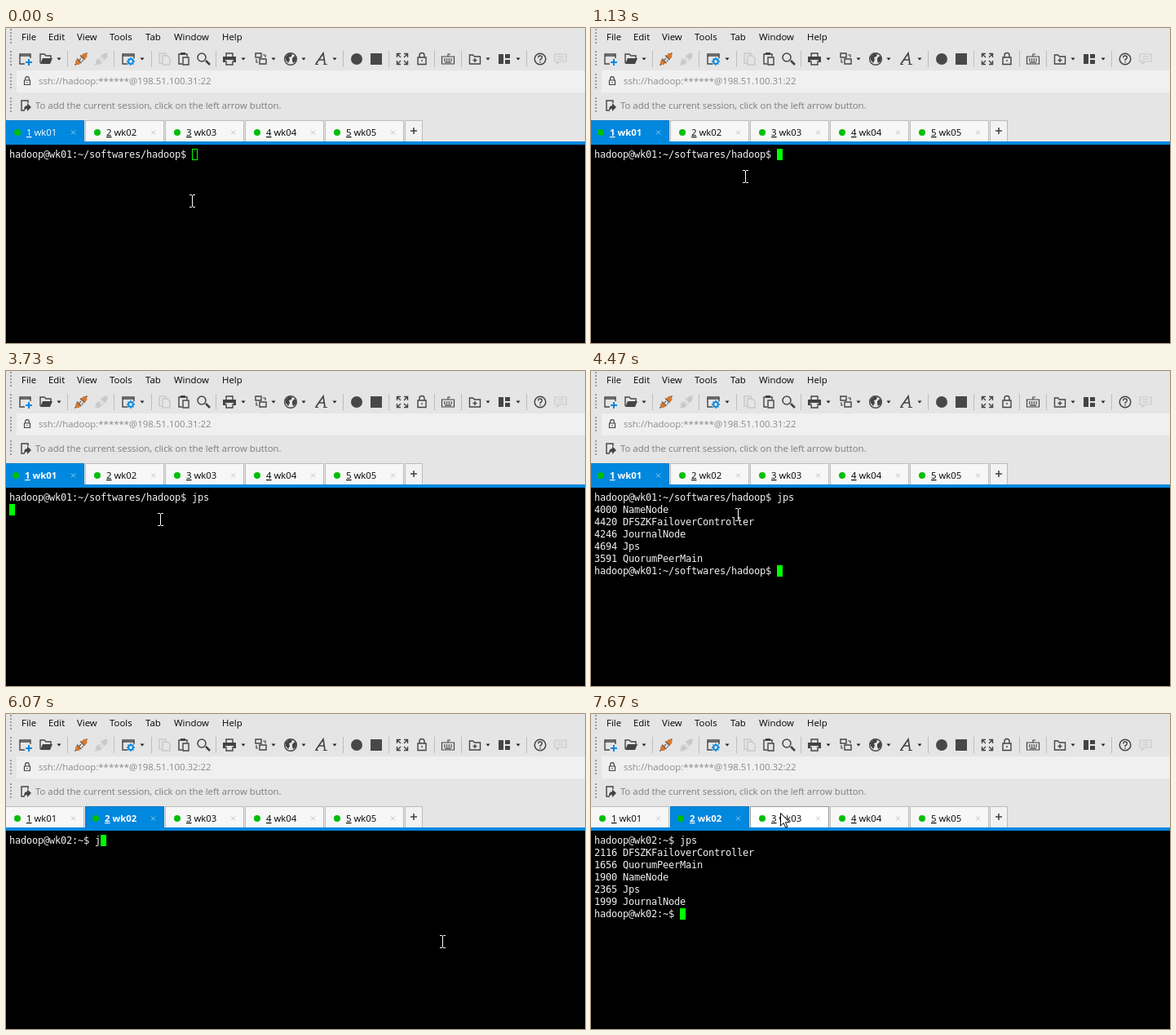
These frames come from a looping animation (710x386 px, 8 s). An HTML page:

```html
<!DOCTYPE html>
<html lang="en">
<head>
<meta charset="utf-8">
<title>Terminal session</title>
<style>
  html, body { margin: 0; width: 100%; height: 100%; overflow: hidden; background: #000; }
  svg { display: block; width: 710px; height: 386px; }
  text { white-space: pre; }
  .ui { font: 11.4px "Open Sans", "Noto Sans", sans-serif; }
  /* 12px type set on a 7px character grid */
  .term { font: 12px "DejaVu Sans Mono", monospace; letter-spacing: -.224px; fill: #f0f0f0; }
</style>
</head>
<body>
<svg viewBox="0 0 710 386">
  <rect width="710" height="143" fill="#e5e5e5"/>
  <rect x="13" y="52" width="697" height="27" fill="#f0f0f0"/>
  <g id="chrome" class="ui"></g>
  <g id="tabs" class="ui"></g>
  <rect y="139" width="710" height="4" fill="#0087de"/>
  <rect y="143" width="710" height="243"/>
  <g id="terminal" class="term"></g>
  <g id="pointer"></g>
</svg>
<script>
const LOOP = 8000, FPS = 15;
const DARK = '#444', PALE = '#c9c9c9', BLUE = '#0087de', GREEN = '#00be0a';
const byId = id => document.getElementById(id);

const label = (x, y, s, fill = '#000', extra = '') =>
  `<text x="${x}" y="${y}" fill="${fill}" ${extra}>${s}</text>`;
const line = (x, y, d, color = DARK, width = 1.4, dash = 'none') =>
  `<path transform="translate(${x} ${y})" d="${d}" fill="none" stroke="${color}" stroke-width="${width}" stroke-dasharray="${dash}"/>`;
const solid = (x, y, d, color = DARK) =>
  `<path transform="translate(${x} ${y})" d="${d}" fill="${color}"/>`;
const rect = (x, y, w, h, fill, extra = '') =>
  `<rect x="${x}" y="${y}" width="${w}" height="${h}" fill="${fill}" ${extra}/>`;
const disc = (x, y, r, fill) => `<circle cx="${x}" cy="${y}" r="${r}" fill="${fill}"/>`;
const ring = (x, y, r, color = DARK, width = 1.5) =>
  `<circle cx="${x}" cy="${y}" r="${r}" fill="none" stroke="${color}" stroke-width="${width}"/>`;

const plug = (x, body, tip) =>
  line(x, 38, 'M-7.5 7.5l3-3M4.5-4.5l3-3', tip, 1.7) +
  solid(x, 38, 'M-4.5 0l4.5 4.5-2 2q-2 1.5-4-.5t-.5-4zM0-4l2.5-2.5q2-1.5 4 .5t.5 4l-2.5 2.5z', body) +
  line(x, 38, 'M-5-.5l5.5 5.5M-1-4.5l5.5 5.5M-2 1l2-2M1 3l1.5-1.5', tip, 1.2);

function toolbar() {
  const separators = [75, 132, 178, 257, 413, 469, 525, 558, 638];
  const dropdowns = [65, 167, 291, 328, 365, 403, 591, 628];
  return [
    ...separators.map(x => line(x + .5, 38, 'M0-10v20', '#bdbdbd', 1)),
    ...dropdowns.map(x => solid(x, 38, 'M-2.5-1.5h5l-2.5 3z', '#222')),
    // new session, open
    line(24, 38, 'M-1 6h-6v-12h13v5M-7-4h13'), line(24, 38, 'M4 0v8M0 4h8', BLUE, 2),
    line(48, 38, 'M-6 5v-11h5l2 2h6v3'), solid(48, 38, 'M-6 6l3-7h12l-3 7z'),
    // connect, disconnect
    plug(92, '#d9782d', '#65564b'), plug(117, PALE, PALE),
    // properties
    line(150, 38, 'M-1 6h-6v-12h14v5M-7-4h14'),
    ring(153, 41, 2.8, BLUE, 1.8),
    line(153, 41, 'M0-5v2M0 3v2M-5 0h2M3 0h2M-3.5-3.5l1.5 1.5M2 2l1.5 1.5M-3.5 3.5l1.5-1.5M2-2l1.5-1.5', BLUE),
    // copy, paste, find
    line(194, 38, 'M-2 5h-4v-12h8v3M-2-4h6l3 3v8h-9z', PALE),
    line(218, 38, 'M-2 6h-4v-12h10v3M-1-2h7v9h-7z'), solid(218, 38, 'M-4-8h6v3h-6z'),
    line(242, 38, 'M3 2l5 5', DARK, 2.6), ring(240, 36, 5),
    // print, transfer, language, font
    solid(274, 38, 'M-8-3h16v7h-3v-3h-10v3h-3z'), line(274, 38, 'M-4-3v-4h8v4M-4 2v5h8v-5'),
    line(312, 38, 'M-6-7h7v5h-7zM-1 0h8v6h-8z'), line(312, 38, 'M3-5h3v3M-5 0v4h2', DARK, 1.2),
    ring(349, 38, 7.3),
    solid(349, 38, 'M-6-3l4-4 4 1-1 3-3 1 1 3-2 4-3-4zM2-1l3-3 2 3-1 4-3 2-1-3z'),
    line(387, 38, 'M-7 6l9-13 2 13M-3 1h7', DARK, 1.7), line(387, 38, 'M-8 6.5h4M2 6.5h5', DARK, 1),
    // companion programs
    disc(430, 38, 7, '#484848'), rect(447, 31, 14, 14, '#484848'),
    // full screen, lock, keyboard
    line(486, 38, 'M-6.5-2v-4.5h4.5M2-6.5h4.5v4.5M6.5 2v4.5h-4.5M-2 6.5h-4.5v-4.5M-6-6l4 4M6-6l-4 4M6 6l-4-4M-6 6l4-4'),
    line(510, 38, 'M-5-2h10v8.5h-10zM-3-2v-2.5a3 3 0 0 1 6 0v2.5M0 1v2'),
    line(542, 38, 'M-7.5-3h15v9h-15zM0-3v-3h3M-4 4.2h8', DARK, 1.2),
    line(542, 38, 'M-5 0h10M-5 2h10', DARK, 1.3, '1.5 1.3'),
    // add, layout, help, comment
    line(575, 38, 'M-6.5-5h4l2 2h7v9h-13zM0-1v5M-2.5 1.5h5'),
    solid(611, 38, 'M-7-6h6v12h-6zM1-6h6v5h-6zM1 1h6v5h-6z'),
    ring(655, 38, 6.8),
    line(655, 38, 'M-2.3-1.5q0-2.5 2.3-2.5t2.3 2-2.3 3v1M0 3v1.5'),
    line(680, 38, 'M-7-6h14v9h-8l-3 3v-3h-3zM-4-3h8M-4 0h8', PALE, 1.2),
  ].join('');
}

function staticChrome() {
  const menu = { File: 19, Edit: 52, View: 87, Tools: 127, Tab: 171, Window: 206, Help: 265 };
  return [1, 28, 56, 85].map(y => line(6, y, 'M0 0v20', '#999', 2, '2 2')).join('') +
    Object.entries(menu).map(([name, x]) => label(x, 15, name)).join('') + toolbar() +
    line(26, 66, 'M-3.5-2h7v5.5h-7zM-2.3-2v-2a2.3 2.3 0 0 1 4.6 0v2M0 0v1.5', DARK, 1.2) +
    line(24, 95, 'M-1 6h-4v-12h8v3', DARK) + solid(24, 95, 'M-2 6q0-6 4-6v-3l5 5-5 5v-3q-2 0-4 2z') +
    label(36, 99, 'To add the current session, click on the left arrow button.', '#7b7b7b');
}

function drawTabs(active, focused, hovered) {
  let out = label(40, 69, `ssh://hadoop:******@198.51.100.3${active}:22`, '#8a8a8a');
  for (let n = 1; n <= 5; n++) {
    const x = 98 * n - 99, on = n === active, over = n === hovered;
    const bold = on && focused, shift = bold ? 2 : 0;
    const fill = on ? BLUE : over ? '#fff' : '#f7f7f7';
    const edge = on ? '#0079c8' : over ? '#999' : '#bcbcbc';
    out += rect(x + .5, 113.5, 96, 27, fill, `stroke="${edge}"`) +
      disc(x + 15 - shift, 128, 4, GREEN) +
      label(x + 26 - shift, 132, `<tspan text-decoration="underline">${n}</tspan> wk0${n}`,
        on ? '#fff' : '#000', bold ? 'font-weight="700"' : '') +
      line(x + 83.5, 128, 'M-2.5-2.5l5 5M2.5-2.5l-5 5', on ? '#8fcbf2' : '#c4c4c4', 1);
  }
  return out + rect(489.5, 113.5, 21, 27, '#f2f2f2', 'stroke="#bcbcbc"') + line(500, 126, 'M-4 0h8M0-4v8', DARK, 1.6);
}

// Frames at which keys are struck and output appears; `early` lines come before the rest.
const sessions = [
  { start: 0, prompt: 'hadoop@wk01:~/softwares/hadoop$ ', keys: [50, 52, 54], enter: 56, partial: 58, done: 58, early: 5,
    output: ['4000 NameNode', '4420 DFSZKFailoverController', '4246 JournalNode', '4694 Jps', '3591 QuorumPeerMain'] },
  { start: 77, prompt: 'hadoop@wk02:~$ ', keys: [91, 93, 95], enter: 97, partial: 99, done: 100, early: 4,
    output: ['2116 DFSZKFailoverController', '1656 QuorumPeerMain', '1900 NameNode', '2365 Jps', '1999 JournalNode'] },
];

function drawTerminal(frame) {
  const s = sessions[frame < sessions[1].start ? 0 : 1];
  const lines = [s.prompt + 'jps'.slice(0, s.keys.filter(k => frame >= k).length)];
  if (frame >= s.partial) lines.push(...s.output.slice(0, frame >= s.done ? 5 : s.early));
  if (frame >= s.done) lines.push(s.prompt);
  else if (frame >= s.enter) lines.push('');
  const row = lines.length - 1, x = 4 + 7 * lines[row].length, y = 148 + 15 * row;
  const caret = frame < 13 ? rect(x + .5, y + .5, 6, 13, 'none', 'stroke="#0f0"') : rect(x, y, 7, 14, '#0f0');
  return lines.map((text, i) => `<text x="4" y="${159 + 15 * i}">${text}</text>`).join('') + caret;
}

// Pointer path: frame, x, y
const path = [
  [0, 228, 212], [4, 180, 140], [6, 164, 127], [8, 170, 139], [11, 186, 185], [15, 186, 185], [16, 187, 181],
  [17, 189, 182], [66, 189, 182], [67, 180, 176], [71, 145, 138], [74, 133, 125], [78, 133, 125],
  [79, 400, 229], [80, 535, 279], [106, 535, 279], [111, 330, 176], [113, 255, 134], [115, 232, 121], [120, 232, 121],
];

function pointerAt(frame) {
  const i = path.findIndex(p => p[0] > frame), [f0, x0, y0] = path[i - 1], [f1, x1, y1] = path[i];
  const u = (frame - f0) / (f1 - f0);
  return [Math.round(x0 + (x1 - x0) * u), Math.round(y0 + (y1 - y0) * u)];
}

const drawPointer = (x, y) => y > 143
  ? line(x + .5, y, 'M-3.5-7.5h3M.5-7.5h3M0-7v14M-3.5 7.5h3M.5 7.5h3', '#fff', 1)
  : `<path transform="translate(${x + .5} ${y + .5})" d="M0 0v15.5l3.6-3.4 2.6 5.7 2.2-1-2.5-5.5h5z" fill="#fff" stroke="#000"/>`;

byId('chrome').innerHTML = staticChrome();
const begin = performance.now();
let shown = -1;

function tick() {
  const time = (performance.now() - begin) % LOOP;
  const frame = Math.min(119, Math.floor((time + 4) * FPS / 1000));
  if (frame !== shown) {
    shown = frame;
    const [x, y] = pointerAt(frame);
    const hovered = y >= 113 && y < 140 ? Math.floor((x + 1) / 98) + 1 : 0;
    byId('tabs').innerHTML = drawTabs(frame < 78 ? 1 : 2, frame >= 14, hovered);
    byId('terminal').innerHTML = drawTerminal(frame);
    byId('pointer').innerHTML = drawPointer(x, y);
  }
  requestAnimationFrame(tick);
}
tick();
</script>
</body>
</html>
```
